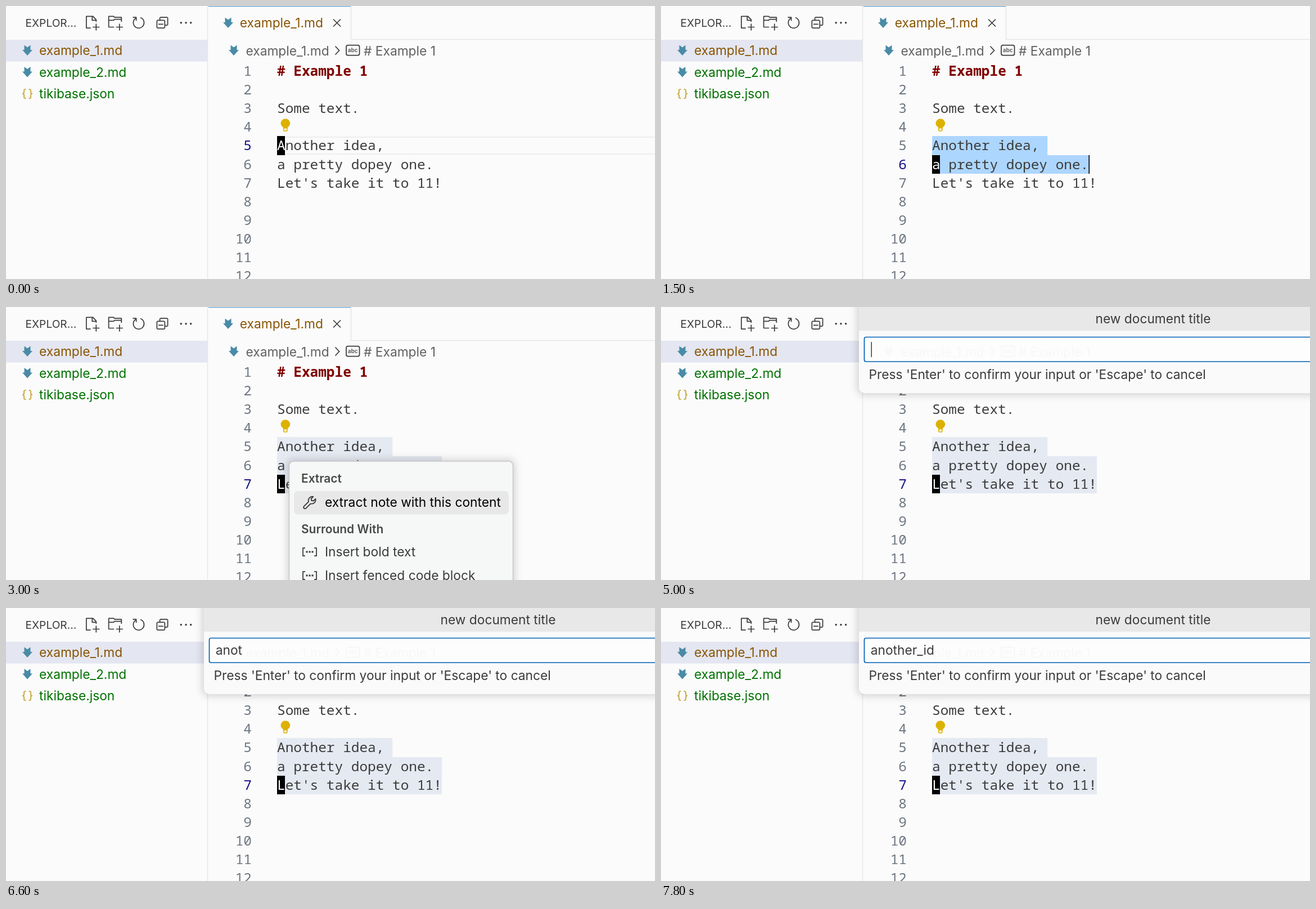
An HTML page for the animation above (8000 ms loop, 1154x485 px).

```html
<!DOCTYPE html>
<html lang="en">
<head>
<meta charset="utf-8">
<title>Extract note</title>
<style>
  html, body { margin: 0; width: 100%; height: 100%; overflow: hidden; background: #fbfbfb; }
  svg { display: block; }
  text { font: 22.75px Inter, sans-serif; font-optical-sizing: none; fill: #3b3b3b; }
  .code text { font: 24.42px "Noto Sans Mono", monospace; white-space: pre; }
  .code .heading { font-weight: 700; fill: #800000; }
  .code .number { fill: #6e7681; text-anchor: end; }
  .code .active { fill: #171184; }
  .code .inverse { fill: #fff; }
  .modified { fill: #895503; }
  .added { fill: #007100; }
  .crumb text { fill: #616161; }
  .title { font-size: 19.2px; }
  .group { font-size: 20.9px; font-weight: 600; fill: #484848; }
  .line { fill: none; stroke: #3b3b3b; stroke-width: 1.75; }
  .icon { fill: #3b3b3b; fill-rule: evenodd; }
  .shadow { fill-opacity: .16; filter: blur(7px); }
</style>
</head>
<body>
<svg width="1154" height="485" viewBox="0 0 1154 485">
  <defs>
    <path id="md" fill="#498ba7" d="M-5.5-9.5 0-5.5 5.5-9.5V-1H9L0 9-9-1h3.5z"/>
    <path id="brace" fill="none" stroke="#cbb150" stroke-width="2.2"
      d="M-2.5-8h-1q-2.5 0-2.5 2.5v3Q-6 0-9 0q3 0 3 2.5v3Q-6 8-3.5 8h1"/>
    <g id="snippet" class="line">
      <path d="M-8-7h-4V7h4M8-7h4V7H8"/>
      <path stroke-width="3" d="M-6.5 0h3M-1.5 0h3M3.5 0h3"/>
    </g>
    <g id="crumb" class="crumb">
      <use href="#md" x="405" y="79"/>
      <text x="426.5" y="87.5">example_1.md</text>
      <path class="line" d="m585.5 71.500 7 7.500-7 7.500"/>
      <rect class="line" x="605" y="69.500" width="23.500" height="18" rx="3"/>
      <text x="616.700" y="81.500" text-anchor="middle" style="font-size:10px;font-weight:700">abc</text>
      <text x="636" y="87.500"># Example 1</text>
    </g>
  </defs>

  <!-- Sidebar -->
  <rect y="60" width="358" height="38.500" fill="#e4e6f1"/>
  <path d="M358.500 0V485" stroke="#e7e7e7" stroke-width="1.500"/>
  <text class="title" x="34.500" y="36.500">EXPLOR…</text>
  <g id="tools" class="icon"></g>
  <use href="#md" x="38" y="79"/>
  <use href="#md" x="38" y="117.500"/>
  <use href="#brace" x="38" y="156"/>
  <use href="#brace" transform="translate(38 156) scale(-1 1)"/>
  <text class="modified" x="59" y="87.300">example_1.md</text>
  <text class="added" x="59" y="125.700">example_2.md</text>
  <text class="added" x="59" y="164.100">tikibase.json</text>

  <!-- Tab and breadcrumb -->
  <path d="M613.500 0V59.500H1154" fill="none" stroke="#e5e5e5" stroke-width="1.500"/>
  <path d="M360 .5H613" stroke="#69a3d2" stroke-width="1.500"/>
  <use href="#md" x="395" y="30"/>
  <text class="modified" x="415.800" y="38">example_1.md</text>
  <path class="line" d="m582 23.500 13 13m0-13-13 13"/>
  <use href="#crumb"/>

  <g id="editor" class="code"></g>

  <!-- Lightbulb -->
  <path fill="#ddb100" d="M493 217.500v-1.700a8.300 8.300 0 1 1 7.700 0v1.700z"/>
  <path fill="none" stroke="#ddb100" stroke-width="1.700" d="M493.800 216v4.500q0 1.500 1.500 1.500h3q1.500 0 1.500-1.500V216"/>

  <g id="menu">
    <rect class="shadow" x="500" y="270.500" width="405" height="270" rx="11"/>
    <rect x="503.500" y="274" width="398" height="260" rx="8" fill="#f6f7f7" stroke="#c8c8c8" stroke-width="1.500"/>
    <text class="group" x="525" y="311.500">Extract</text>
    <rect x="512" y="327" width="382" height="41.500" rx="7" fill="#e8e8e8"/>
    <path class="line" style="stroke-width:1.100;stroke-linejoin:round" transform="translate(526 333.500) scale(1.744)"
      d="M13.900 4.200 11.900 6.200 9.800 5.900 9.600 4l2-2A4 4 0 0 0 6.900 7.100L2.200 11.800a1.400 1.400 0 0 0 2 2L9 9.100a4 4 0 0 0 4.900-4.900z"/>
    <text x="567" y="355.200" style="fill:#000">extract note with this content</text>
    <text class="group" x="525" y="402.300">Surround With</text>
    <use href="#snippet" x="540" y="435"/>
    <text x="567" y="442.500">Insert bold text</text>
    <use href="#snippet" x="540" y="477"/>
    <text x="567" y="484.500">Insert fenced code block</text>
  </g>

  <g id="prompt">
    <rect class="shadow" x="348.500" y="-24" width="1053" height="180.500" rx="13"/>
    <rect x="352" y="-20" width="1046" height="173" rx="10" fill="#fafafa"/>
    <rect x="352" y="0" width="802" height="42" fill="#e8e8e8"/>
    <text x="875" y="29" text-anchor="middle">new document title</text>
    <rect x="361.500" y="53.500" width="1028" height="43.500" rx="3" fill="#fdfdfd" stroke="#005fb8" stroke-width="1.700"/>
    <use href="#crumb" opacity=".03"/>
    <text id="typed" x="372.700" y="83"></text>
    <rect id="inputCaret" x="373.500" y="62" width="1.500" height="27" fill="#3b3b3b"/>
    <text x="369.500" y="128">Press 'Enter' to confirm your input or 'Escape' to cancel</text>
  </g>
</svg>
<script>
const LOOP = 8000, LEFT = 482, TOP = 98.85, CHAR = 14.652, ROW = 33.14;
const LINES = ["# Example 1", "", "Some text.", "", "Another idea,", "a pretty dopey one.", "Let's take it to 11!"];
const TITLE = "another_id", TYPE_START = 6000, TYPE_STEP = 200;

// Selected columns are listed from the fifth line down.
const STEPS = [
  { at: 0, row: 4, selected: [], outline: true },
  { at: 1000, row: 4, selected: [13], caret: 13 },
  { at: 1500, row: 5, selected: [14, 19], caret: 19 },
  { at: 2000, row: 6, selected: [14, 20, 20], caret: 20 },
  { at: 3000, row: 6, selected: [14, 20, 20], muted: true, panel: "menu" },
  { at: 5000, row: 6, selected: [14, 20, 20], muted: true, panel: "prompt" }
];

const TOOLS = [
  [138.5, "M9.5 1.1l3.4 3.5.1.4v2h-1V6H8V2H3v11h4v1H2.5l-.5-.5v-12l.5-.5h6.7l.3.1zM9 2v3h2.9L9 2zm4 14h-1v-3H9v-1h3V9h1v3h3v1h-3v3z"],
  [180, "M14.5 2H7.7l-.85-.85L6.5 1h-5l-.5.5v11l.5.5H7v-1H2V6h4.5l.35-.15.85-.85H14v2h1V2.5zM14 4H7.5l-.35.15-.85.85H2V2h4.3l.85.85.35.15H14zM13 16h-1v-3H9v-1h3V9h1v3h3v1h-3z"],
  [222, "M4.68 3H2V2h3.5l.5.5V6H5V4a5 5 0 1 0 4.53-.76l.3-.955A6 6 0 1 1 4.68 3z"],
  [264, "M9 9H4v1h5zM5 3l1-1h7l1 1v7l-1 1h-2v2l-1 1H3l-1-1V6l1-1h2zm1 2h4l1 1v4h2V3H6zm4 1H3v7h7z"],
  [306, "M4 8a1 1 0 1 1-2 0 1 1 0 0 1 2 0zM9 8a1 1 0 1 1-2 0 1 1 0 0 1 2 0zM14 8a1 1 0 1 1-2 0 1 1 0 0 1 2 0z"]
];

const byId = id => document.getElementById(id);
const rowTop = row => Math.round(TOP + row * ROW);
const rect = (x, y, w, h, fill) => `<rect x="${x}" y="${y}" width="${w}" height="${h}" fill="${fill}"/>`;
const rowRect = (x, row, w, fill) => rect(x, rowTop(row), w, rowTop(row + 1) - rowTop(row), fill);
const codeText = (x, row, text, style = "") =>
  `<text x="${x}" y="${rowTop(row) + 25}" class="${style}">${text}</text>`;

function editorMarkup({ row, selected, caret, outline, muted }) {
  let out = "";
  if (outline) {
    for (const y of [rowTop(row) + 1, rowTop(row + 1) - 2.7]) out += rect(LEFT, y, 672, 1.7, "#ebebeb");
  }
  selected.forEach((columns, i) => {
    out += rowRect(LEFT, 4 + i, columns * CHAR, muted ? "#e5e9f2" : "#add6ff");
  });
  for (let i = 0; i < 12; i++) out += codeText(437, i, i + 1, i === row ? "number active" : "number");
  LINES.forEach((text, i) => { out += codeText(LEFT, i, text, i ? "" : "heading"); });
  out += rowRect(LEFT, row, 14, "#000") + codeText(LEFT, row, LINES[row][0], "inverse");
  if (caret) out += rowRect(LEFT + caret * CHAR, row, 1.7, "#000");
  return out;
}

byId("tools").innerHTML = TOOLS.map(([x, d]) =>
  `<path transform="translate(${x} 15.7) scale(1.744)" d="${d}"/>`).join("");

let shown = null;
function render(time) {
  const step = STEPS.findLast(s => s.at <= time);
  if (step !== shown) {
    shown = step;
    byId("editor").innerHTML = editorMarkup(step);
    for (const id of ["menu", "prompt"]) byId(id).style.display = step.panel === id ? "" : "none";
  }
  const count = Math.max(0, Math.floor((time - TYPE_START) / TYPE_STEP) + 1);
  byId("typed").textContent = TITLE.slice(0, count);
  byId("inputCaret").style.display = count ? "none" : "";
}

const start = performance.now();
function tick() {
  render((performance.now() - start) % LOOP);
  requestAnimationFrame(tick);
}
tick();
</script>
</body>
</html>
```
